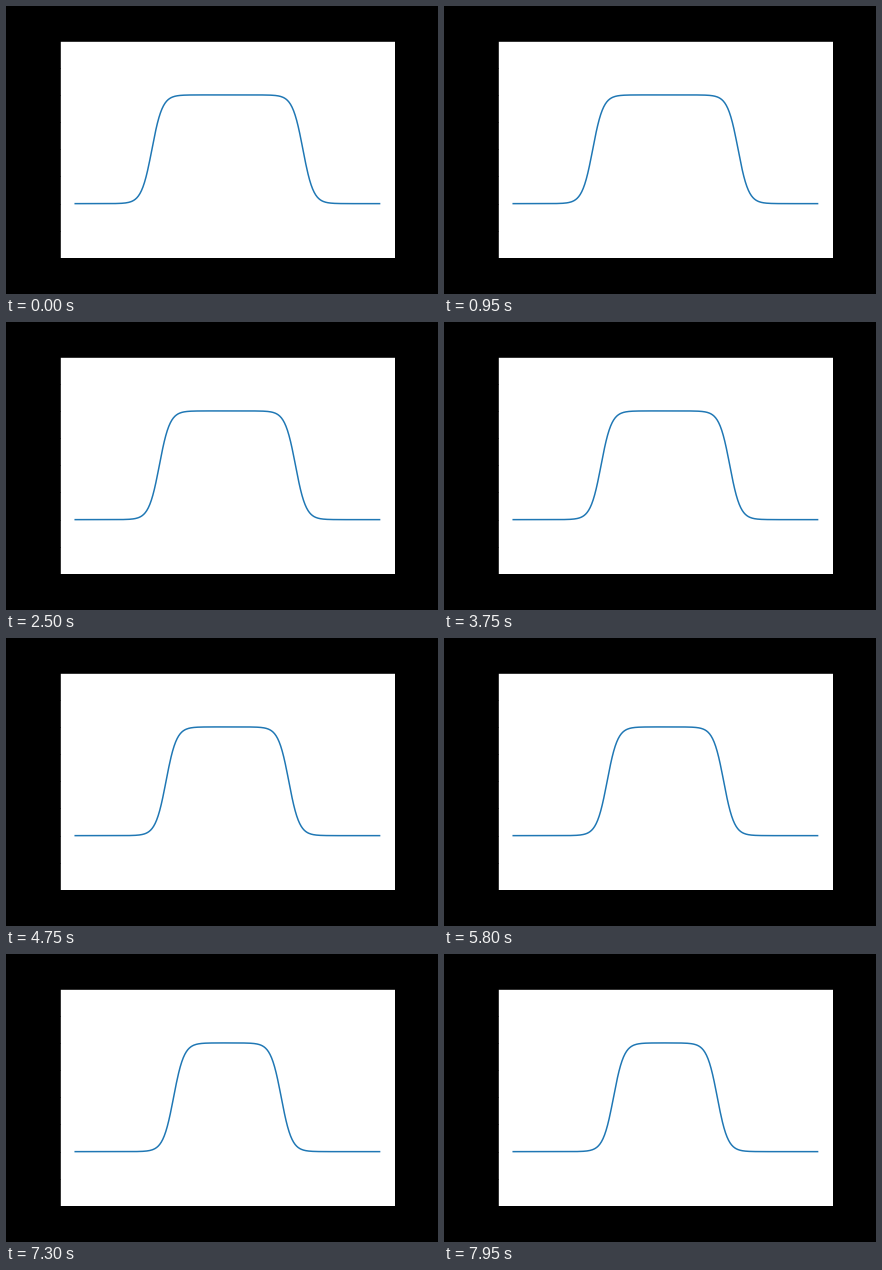
These frames come from a looping animation (432 px wide and 288 px high, 8 s). A matplotlib script:

```python
import numpy as np
import matplotlib.pyplot as plt
from matplotlib.animation import FuncAnimation

FRAMES = 160
INTERVAL = 50

# Units: the pulse lives on [-1, 1]; the fronts drift inward at constant speed.
START, END = 0.496, 0.341
WIDTH = 0.0345

x = np.linspace(-1, 1, 401)


def pulse(half):
    """Flat-topped bump with logistic fronts at -half and +half."""
    return 0.5 * (np.tanh((x + half) / (2 * WIDTH))
                  - np.tanh((x - half) / (2 * WIDTH)))


fig = plt.figure(figsize=(6, 4), dpi=72, facecolor="black")
fig.subplots_adjust(left=0.125, right=0.9, bottom=0.125, top=0.88)
ax = fig.add_subplot(facecolor="white")
ax.set_xlim(-1.1, 1.1)
ax.set_ylim(-0.5, 1.5)
line, = ax.plot(x, pulse(START), color="#1f77b4", lw=1.5)


def update(i):
    half = START + (END - START) * i / (FRAMES - 1)
    line.set_ydata(pulse(half))
    return line,


anim = FuncAnimation(fig, update, frames=FRAMES, interval=INTERVAL,
                     repeat=True, repeat_delay=0)
plt.show()
```
